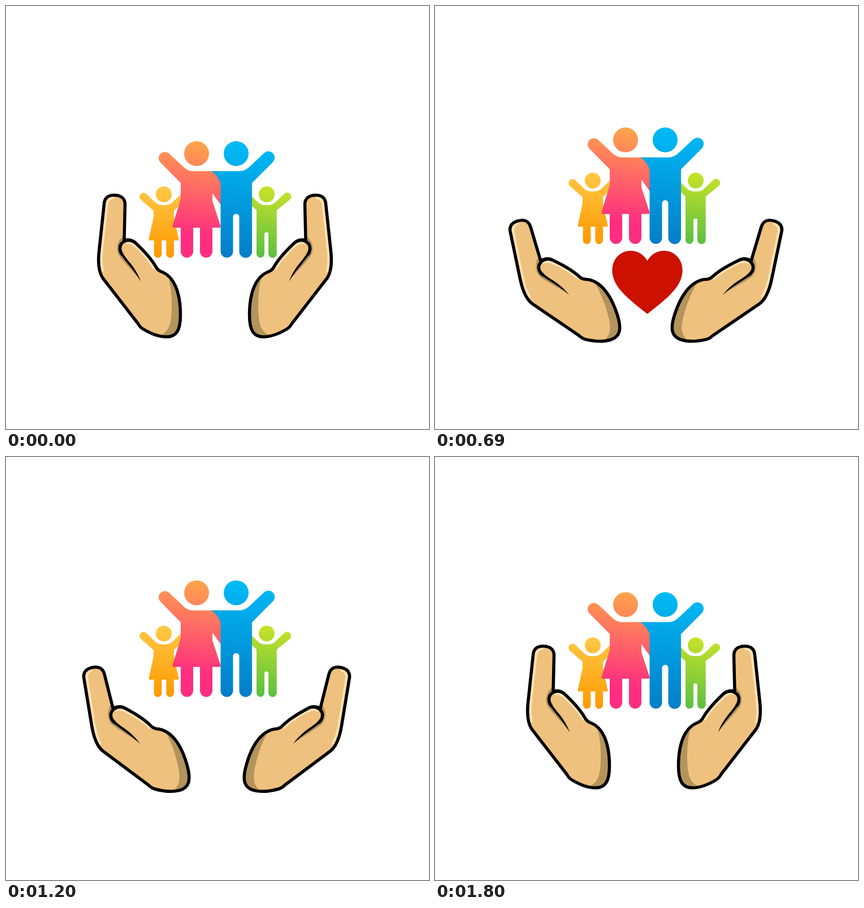
An HTML page that plays this animation: 748x748 px, repeating every 1.83 s.

```html
<!DOCTYPE html>
<html lang="en">
<head>
<meta charset="utf-8">
<title>Caring hands</title>
<style>
  html, body { margin: 0; width: 100%; height: 100%; overflow: hidden; background: #fff; }
  svg { display: block; width: 100%; height: 100%; }
</style>
</head>
<body>
<svg viewBox="0 0 748 748">
  <defs>
    <linearGradient id="pink" gradientUnits="userSpaceOnUse" x1="345" y1="239" x2="325" y2="405">
      <stop offset="0" stop-color="#ffa64b"/><stop offset="1" stop-color="#ff2d7f"/>
    </linearGradient>
    <linearGradient id="blue" gradientUnits="userSpaceOnUse" x1="417" y1="239" x2="397" y2="445">
      <stop offset="0" stop-color="#00bbf6"/><stop offset="1" stop-color="#047dc8"/>
    </linearGradient>
    <linearGradient id="gold" gradientUnits="userSpaceOnUse" x1="285" y1="319" x2="273" y2="445">
      <stop offset="0" stop-color="#ffc947"/><stop offset="1" stop-color="#ff9800"/>
    </linearGradient>
    <linearGradient id="green" gradientUnits="userSpaceOnUse" x1="469" y1="319" x2="453" y2="445">
      <stop offset="0" stop-color="#c9e328"/><stop offset="1" stop-color="#5abf42"/>
    </linearGradient>
    <path id="palm" d="M173.500 350C174 340 180 334.500 191 334.500C203 334.500 210.500 340 210.500 351L209 414
      C214 413 222 413 228 418C242 431 257 447 265 461Q268 467 274 469.500C298 478 308.500 508 308.500 546
      C308.500 574 301 585 284 585C268 585 252 577 242 571Q237 568 233 561L171 481C163 469 163 448 164.500 434Z"/>
    <clipPath id="inside"><use href="#palm"/></clipPath>
    <g id="hand">
      <use href="#palm" fill="#efc17e"/>
      <g clip-path="url(#inside)">
        <path fill="#b3945c" d="M285 470C294 500 294 530 292 551C290 570 283 580 268 584L285 592L315 585V480Z"/>
        <path fill="#b3945c" d="M212 404C198 411 193 428 199 440C207 453 223 466 238 487L226 440Z"/>
        <path fill="none" stroke="#ffe2b5" stroke-width="4" stroke-linecap="round"
          d="M190 339C182 340 179 345 178.500 352L169.500 434C168.500 448 168.500 458 171 468"/>
      </g>
      <path fill="#efc17e" d="M228 418C218 411 202 416 202 429C202 441 216 449 238 487L262 470L264 460C256 446 242 431 228 418Z"/>
      <path fill="none" stroke="#ffe2b5" stroke-width="4" stroke-linecap="round"
        d="M213 419C219 417 224 421 228 424C241 436 254 450 262 464"/>
      <path fill="#000" d="M200 434C205 446 224 463 238.500 487C233 472 224 459 215 449L204 434Z"/>
      <path fill="none" stroke="#000" stroke-width="5.5" stroke-linecap="round"
        d="M228 418C217 410 201 416 201.500 429Q202 435 205 439"/>
      <use href="#palm" fill="none" stroke="#000" stroke-width="5.5" stroke-linejoin="round"/>
    </g>
  </defs>

  <g id="family">
    <g fill="url(#gold)">
      <circle cx="279" cy="333" r="14"/>
      <path d="M238.500 342.500A7 7 0 0 1 248 332L262 345.500Q268 352 275 352H283Q290 352 296 345.500L310 332L318 342L297 362V373
        L305.500 412.500Q306 414.500 304 414.500H297V438.500A6.800 6.800 0 0 1 283.400 438.500V414.500H275.300V438.500
        A6.800 6.800 0 0 1 261.700 438.500V414.500H254Q252 414.500 252.500 412.500L261 373V362Z"/>
    </g>
    <g fill="url(#green)">
      <circle cx="461" cy="333" r="14"/>
      <path d="M502 342.500A7 7 0 0 0 492 332L478 345.500Q472 352 465 352H457Q450 352 444 345.500L430 332L422 342L443 361V438
        A7 7 0 0 0 457 438V403.500A3.500 3.500 0 0 1 464 403.500V438A7.300 7.300 0 0 0 478.700 438V361Z"/>
    </g>
    <g fill="url(#pink)">
      <circle cx="337" cy="261" r="22"/>
      <path d="M272.500 276A11 11 0 0 1 288 260.500L311 282Q320 292 331 292H385V359L365 331V345L379.500 389
        Q380 392 377 392H365V434A11 11 0 0 1 343 434V392H331V434A11 11 0 0 1 309 434V392H297Q294 392 294.500 389L309 341V313Z"/>
    </g>
    <g fill="url(#blue)">
      <circle cx="407" cy="261" r="22"/>
      <path d="M363 292H412Q424 292 433 282L456 260.500A11 11 0 0 1 472 276L435 313V434A11 11 0 0 1 412.500 434V373
        A5.500 5.500 0 0 0 401.500 373V434A11 11 0 0 1 379.500 434V313Q374 299 363 292Z"/>
    </g>
  </g>

  <path id="heart" fill="#cc1100" d="M0 52.500C-30 28 -62.500 6 -62.500 -25C-62.500 -46 -47 -60 -30 -60
    C-17 -60 -6 -53 0 -42C6 -53 17 -60 30 -60C47 -60 62.500 -46 62.500 -25C62.500 6 30 28 0 52.500Z"/>
  <use id="left" href="#hand"/>
  <use id="right" href="#hand"/>
</svg>
<script>
  const LOOP = 1830, STEP = 30, SWING = 1800;
  const RISE = 27.8, TURN = 20.6, DRIFT = 8;
  const start = performance.now();
  const part = id => document.getElementById(id);
  const [family, heart, left, right] = ["family", "heart", "left", "right"].map(part);
  const move = (el, value) => el.setAttribute("transform", value);
  const clamp = x => Math.min(1, Math.max(0, x));
  const wave = u => (1 - Math.cos(Math.PI * u)) / 2;

  // Pops in quickly, then shrinks away
  function heartSize(t) {
    const grow = 1 - (1 - clamp(t / 840)) ** 3;
    return grow * (1 - wave(clamp((t - 840) / 370)));
  }

  function draw(t) {
    const p = wave(2 * t / SWING);
    const lift = -6 * p * (1 - p);
    const pose = `translate(${-p} ${lift}) rotate(${-TURN * p} 316 500)`;
    move(family, `translate(0 ${-RISE * p})`);
    move(left, pose);
    move(right, `translate(${739 + DRIFT * p} 0) scale(-1 1) ${pose}`);
    move(heart, `translate(375.5 492.4) scale(${heartSize(t)})`);
  }

  function tick() {
    const t = (performance.now() - start) % LOOP;
    draw(Math.floor(t / STEP) * STEP);
    requestAnimationFrame(tick);
  }
  tick();
</script>
</body>
</html>
```
